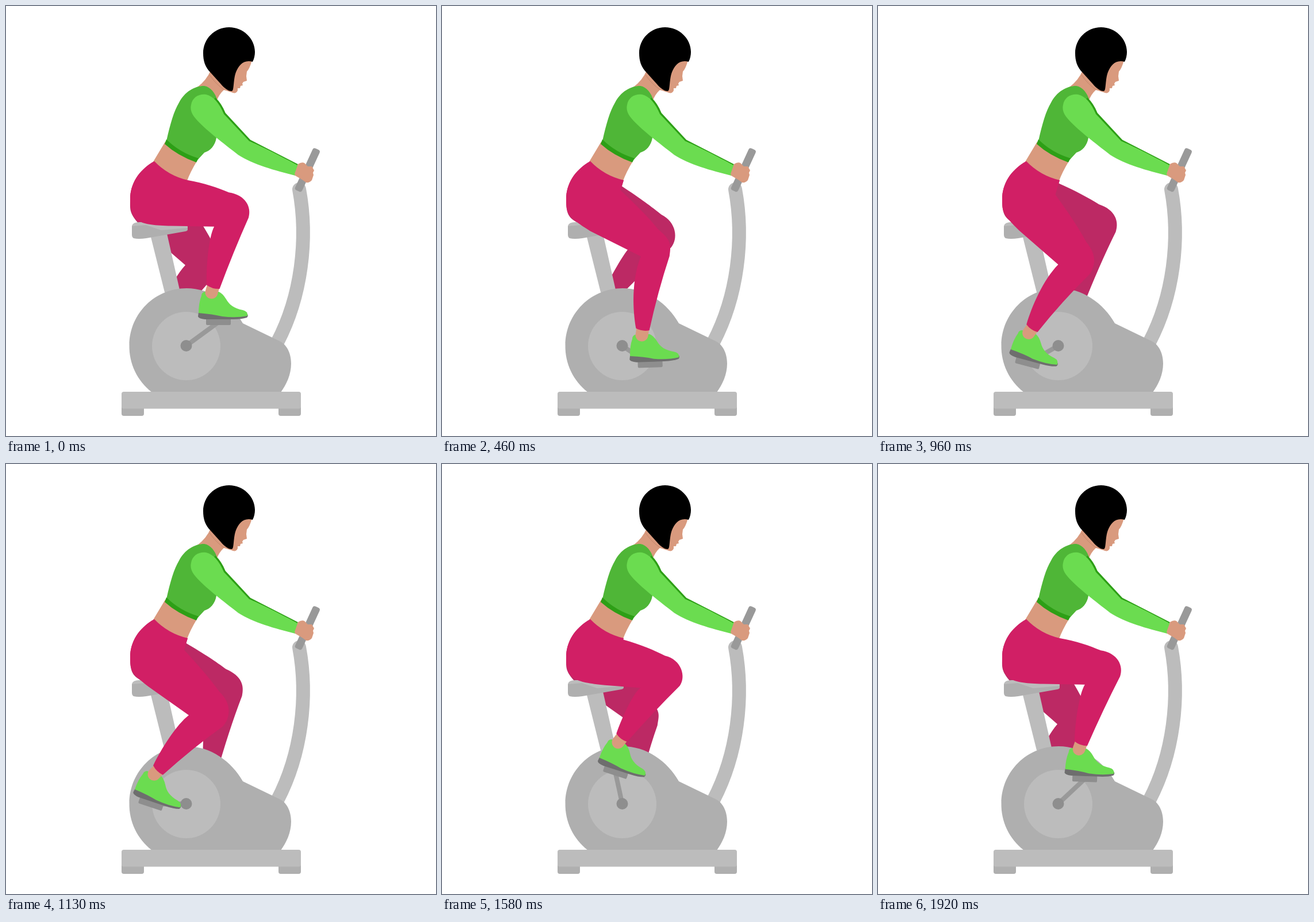
An HTML page with a canvas that plays this animation: 748 px wide and 748 px high, repeating every 1960 ms.

```html
<!DOCTYPE html>
<html>
<head>
<meta charset="utf-8">
<title>Exercise bike</title>
<style>
html, body { margin: 0; width: 100%; height: 100%; overflow: hidden; background: #fff; }
canvas { display: block; width: 748px; height: 748px; }
</style>
</head>
<body>
<canvas id="stage" width="748" height="748"></canvas>
<script>
const ctx = document.getElementById('stage').getContext('2d');
const LOOP = 1960, FRAMES = 47, DEG = Math.PI / 180;
const HUB = [313.5, 591], PEDAL = [369.5, 550], HIP = [255, 331];
const THIGH = 147, SHIN = 158;
const C = {
  pink: '#d11f65', plum: '#bc2964', skin: '#d99a7e', lime: '#6bdc50', green: '#4fb637', deep: '#2d9f16',
  body: '#afafaf', light: '#bcbcbc', metal: '#999', hub: '#8e8e8e', sole: '#6e6e6e'
};

// Pedal path: time, x, y, foot tilt in degrees
const KEYS = [
  [0, 369.5, 550, 0], [460, 362, 624, -2], [750, 304.5, 647, 5], [960, 260, 621.5, 15],
  [1330, 265, 557, 19], [1580, 301, 537, 18], [1920, 360, 548, 2]
];

function keyAt(i) {
  const n = KEYS.length, turn = Math.floor(i / n), [t, ...v] = KEYS[i - turn * n];
  return [t + turn * LOOP, ...v];
}

// Smooth periodic interpolation through the keys
function pose(t) {
  const i = KEYS.findLastIndex(k => k[0] <= t);
  const [a, b, c, d] = [-1, 0, 1, 2].map(j => keyAt(i + j));
  const h = c[0] - b[0], u = (t - b[0]) / h;
  const slope = (p, q, j) => (q[j] - p[j]) / (q[0] - p[0]);
  const tangent = (p, q, r, j) =>
    ((r[0] - q[0]) * slope(p, q, j) + (q[0] - p[0]) * slope(q, r, j)) / (r[0] - p[0]);
  const [x, y, tilt] = [1, 2, 3].map(j =>
    b[j] * (1 + 2 * u) * (1 - u) ** 2 + c[j] * u * u * (3 - 2 * u) +
    h * u * (1 - u) * (tangent(a, b, c, j) * (1 - u) - tangent(b, c, d, j) * u));
  return { x, y, tilt: tilt * DEG };
}

// The far ankle follows an ellipse, a little slower near the front
function farAnkle(t) {
  const turn = 360 * DEG / LOOP;
  const a = 154 * DEG + turn * t - 8 * DEG + 12 * DEG * Math.cos(turn * (t - 380));
  return [305 + 50 * Math.cos(a), 557 + 45 * Math.sin(a)];
}

// Point measured along a direction and sideways from it
const at = ([x, y], a, along, side) =>
  [x + Math.cos(a) * along + Math.sin(a) * side, y + Math.sin(a) * along - Math.cos(a) * side];

function joints(ankle, hip) {
  const dx = ankle[0] - hip[0], dy = ankle[1] - hip[1], d = Math.hypot(dx, dy);
  const bend = Math.acos((d * d + THIGH ** 2 - SHIN ** 2) / (2 * d * THIGH));
  const thigh = Math.atan2(dy, dx) - bend;
  const knee = at(hip, thigh, THIGH, 0);
  return { hip, knee, thigh, shin: Math.atan2(ankle[1] - knee[1], ankle[0] - knee[0]) };
}

function drawLeg({ hip, knee, thigh, shin }, hem, color) {
  const lift = Math.max(0, Math.min(1.05, (54 - thigh / DEG) / 45)), low = 1 - lift;
  const up = (l, s) => at(hip, thigh, l, s), down = (l, s) => at(knee, shin, l, s);
  const half = (thigh + Math.PI - shin) / 2;
  const back = at(knee, shin + half - 6 * DEG, 96 - 1.15 * half / DEG, 0);
  const curve = (...pts) => ctx.bezierCurveTo(...pts.flat());
  ctx.beginPath();
  ctx.moveTo(316, 303);
  ctx.quadraticCurveTo(282, 295, 258, 270);
  curve([230, 286], [216, 310], [216, 336]);
  curve([216, 356 + 20 * lift], up(-15 * lift, -49 - 4 * lift), up(40, -45 - lift));
  ctx.lineTo(...back);
  curve(down(60, -32), down(110, -22), down(hem, -11.7));
  ctx.quadraticCurveTo(...down(hem + 4, 0), ...down(hem, 11.7));
  ctx.quadraticCurveTo(...down(72, 16.5), ...down(8, 25 + 4 * low));
  curve(down(-11, 25 + 4 * low), up(160, 27 + 6 * low), up(130, 27 + 6 * low));
  curve(up(110, 32 + 5 * low), up(85, 37 + 3 * low), [316 - 8 * low, 303 + 27 * low]);
  ctx.closePath();
  ctx.fillStyle = color;
  ctx.fill();
}

function fill(color, d) {
  ctx.fillStyle = color;
  ctx.fill(new Path2D(d));
}

function line(color, width, d, cap = 'butt') {
  ctx.strokeStyle = color;
  ctx.lineWidth = width;
  ctx.lineCap = cap;
  ctx.lineJoin = 'round';
  ctx.stroke(new Path2D(d));
}

function box(color, x, y, w, h, r) {
  ctx.beginPath();
  ctx.roundRect(x, y, w, h, r);
  ctx.fillStyle = color;
  ctx.fill();
}

function dot(color, x, y, r) {
  ctx.beginPath();
  ctx.arc(x, y, r, 0, 7);
  ctx.fillStyle = color;
  ctx.fill();
}

function drawMachine() {
  fill(C.light, 'M252 402L280 396L303 498H276Z');
  fill(C.body, 'M222 381H316V389Q316 391 312 392L244 404Q230 406 222 404Q219 402 219 398V384Q219 381 222 381Z');
  fill(C.light, 'M219 383Q220 376 232 376H300L316 384V386L270 390L243 381Z');
  line(C.light, 24, 'M510 319C526 405 514 505 472 585', 'round');
  fill(C.body, 'M254 672C228 652 214 622 214.5 590C215 535 259 491 314 491C356 491 392 517 412 552L476 583C490 590 496 606 496 622C496 641 488 658 478 672Z');
  dot(C.light, 313.5, 591.5, 59.5);
  box(C.body, 201, 695, 39, 18, 4);
  box(C.body, 474, 695, 39, 18, 4);
  box(C.light, 201, 671, 312, 29.5, 4);
}

function drawBody() {
  fill(C.skin, 'M277 236L256 271L285 300L315 304Q321 288 332 270Z');
  fill(C.skin, 'M356 112Q349 129 333 141L366 166Q371 153 379 146L392 150Q400 154 403 147V143L407 143L408 139L412 138L411 135L413 132L419 130L418 122L419 114Q424 109 428 94H400L380 110Z');
  line('#c4866a', 1, 'M354 120Q366 137 380 146');
  fill(C.green, 'M279 235C286 204 292 183 301 168C311 149 328 139 345 139C356 141 364 151 368 165L381 187L366 229C364 243 355 252 345 255L334 267Q303 258 279 235Z');
  fill(C.deep, 'M279 232Q302 255 335 265L331 272Q298 260 276 240Z');
  line(C.deep, 4, 'M363 161Q373 170 380 187L424 234.5L507 277');
  fill(C.lime, 'M322 172C324 158 337 152 348 154C361 157 371 169 379 188L423 235C438 241 480 262 509 278L503 295C468 286 430 276 404 259C380 240 345 214 330 196C323 188 320 180 322 172Z');
  ctx.save();
  ctx.translate(524.3, 285.3);
  ctx.rotate(24.7 * DEG);
  box(C.metal, -6.7, -40, 13.4, 80, 4);
  ctx.restore();
  fill(C.skin, 'M502 292L508 275Q514 271 519 273L525 279L532 279L536 286L534 290L535 294L532 303Q528 308 522 307L515 302L503 295Z');
  fill('#000', 'M429 97C413 93 405 103 400 115C395 128 397 147 393 148C388 149 380 143 374 136L356 116C346 106 343 95 343 82C343 57 363 37 388 37C413 37 433 57 433 80Q433 89 429 97Z');
}

function drawFoot(p) {
  line(C.metal, 8, `M${HUB}L${p.x} ${p.y}`);
  dot(C.hub, ...HUB, 10);
  ctx.save();
  ctx.translate(p.x, p.y);
  ctx.rotate(p.tilt);
  ctx.translate(-PEDAL[0], -PEDAL[1]);
  box(C.hub, 348, 543, 43, 12, 2);
  fill(C.sole, 'M335 533L420 536Q422 539 419 542Q410 545 395 545H346Q335 544 334 540Z');
  fill(C.lime, 'M345 497Q340 499 340 504Q335 517 335 534Q360 536 376 540Q400 543 420 539Q421 531 412 529C396 526 388 519 383 510Q377 500 370 497Z');
  ctx.restore();
}

function draw(now) {
  // Steps of a 24 fps clip, rounded to hundredths of a second
  const step = Math.floor((now % LOOP + 5) * FRAMES / LOOP) % FRAMES;
  const t = step * LOOP / FRAMES;

  const foot = pose(t);
  const near = joints(at([foot.x, foot.y], foot.tilt, -14, 45), HIP);
  const far = joints(farAnkle(t), [HIP[0] - 3, HIP[1]]);
  ctx.fillStyle = '#fff';
  ctx.fillRect(0, 0, 748, 748);
  drawLeg(far, 152, C.plum);
  drawMachine();
  drawBody();
  drawFoot(foot);
  line(C.skin, 22, `M${at(near.knee, near.shin, 136, 0)}L${at(near.knee, near.shin, 151, 0)}`, 'round');
  drawLeg(near, 141, C.pink);
}

const start = performance.now();
function tick() {
  draw(performance.now() - start);
  requestAnimationFrame(tick);
}
tick();
</script>
</body>
</html>
```
